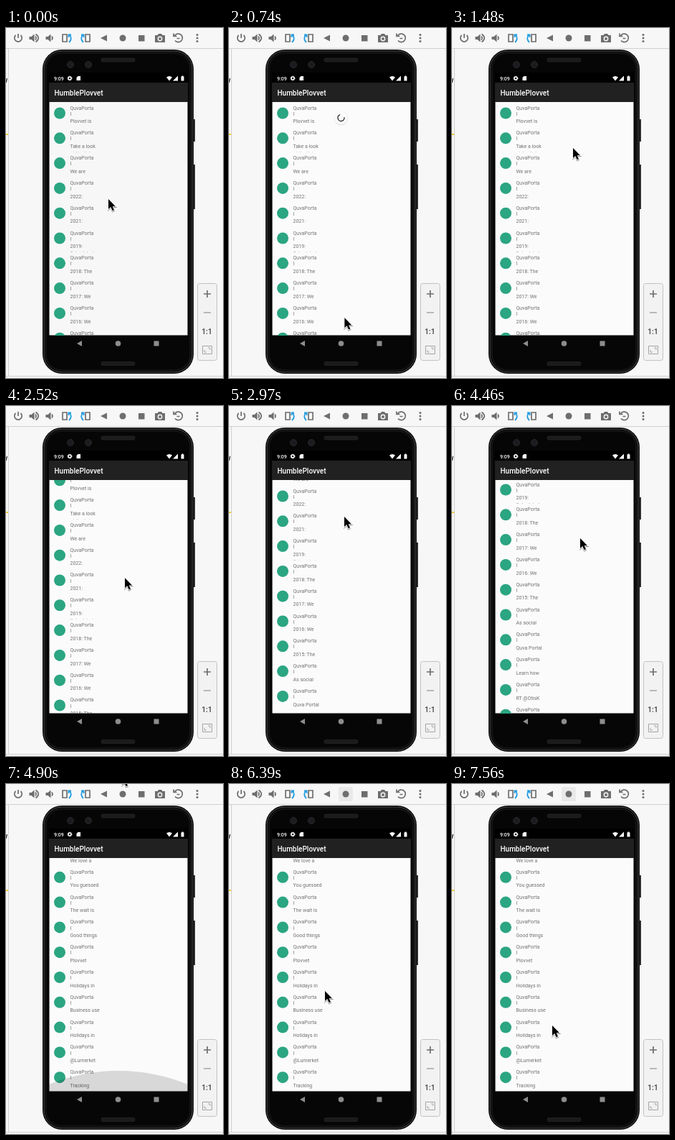
These frames come from a looping animation (303x487 px, 8 s). An HTML page:

```html
<!DOCTYPE html>
<html lang="en">
<head>
<meta charset="utf-8">
<style>
  html, body { margin: 0; height: 100%; overflow: hidden; background: #f7f7f7; }
  svg { display: block; font-family: Roboto, sans-serif; }
  .icon { fill: none; stroke: #6e6e6e; stroke-width: 1.7; }
  .solid { fill: #6e6e6e; }
  .blue { fill: none; stroke: #1e9be0; stroke-width: 1.8; }
  .row text { font-size: 7px; fill: #727272; }
  #cursor { filter: drop-shadow(.5px 1px .7px #0007); }
</style>
</head>
<body>
<svg width="303" height="487" viewBox="0 0 303 487">
  <!-- emulator window -->
  <rect width="303" height="487" fill="#f7f7f7"/>
  <path d="M3.5 28V484M0 28.500H303M0 484.500H303" stroke="#d0d0d0" fill="none"/>
  <path d="M0 148H3" stroke="#f2cf3a" stroke-width="2"/>
  <path d="M1.500 70L0 76" stroke="#222" stroke-width="1.200"/>

  <!-- toolbar -->
  <rect id="hover" x="153" y="4" width="20" height="20" rx="2" fill="#e9e9e9"/>
  <path class="icon" d="M17 8V14M13.500 10A5.200 5.200 0 1 0 20.500 10"/>
  <g id="speaker">
    <path class="solid" d="M32.500 12H35.500L39.500 8.500V19.500L35.500 16H32.500Z"/>
    <path class="icon" d="M41 11.500Q43 14 41 16.500"/>
  </g>
  <use href="#speaker" x="23"/>
  <path class="icon" d="M41.500 8.500Q49 14 41.500 19.500"/>
  <path class="icon" d="M79 9H85V19H79Z"/>
  <path class="blue" d="M88 20Q93 15 89 10M87.500 13V9.500H91"/>
  <path class="icon" d="M111 9H117V19H111Z"/>
  <path class="blue" d="M108 20Q103 15 107 10M108.500 13V9.500H105"/>
  <path class="solid" d="M132 14L141 9.500V18.500ZM185 10H193.500V18.500H185Z"/>
  <circle class="solid" cx="163" cy="14" r="4.500"/>
  <path class="solid" d="M208 10H211.500L213 8H217L218.500 10H222V20H208Z"/>
  <circle cx="215" cy="15" r="2.700" fill="#6e6e6e" stroke="#f7f7f7" stroke-width="1.400"/>
  <path class="icon" d="M235.500 11A5.800 5.800 0 1 1 236 17.500M234 7.500V11.500H238.500M238.500 14.500H242.500"/>
  <g class="solid"><circle cx="267" cy="9.500" r="1.500"/><circle cx="267" cy="14" r="1.500"/><circle cx="267" cy="18.500" r="1.500"/></g>

  <!-- zoom panel -->
  <rect x="267.500" y="355.500" width="27" height="107" rx="3" fill="#f2f2f2" stroke="#c2c2c2"/>
  <path class="icon" d="M276 370H286M281 365V375"/>
  <path d="M276 396H286" stroke="#aaa" stroke-width="1.600"/>
  <text x="280.500" y="425.500" font-size="10" font-weight="700" fill="#555" text-anchor="middle">1:1</text>
  <path d="M274.500 442.500H287.500V453.500H274.500ZM277 448V451H280M282 445H285V448" fill="none" stroke="#a5a5a5"/>

  <!-- phone -->
  <path d="M263 127V158M263 190V252" stroke="#2c2c2c" stroke-width="2"/>
  <rect x="51" y="30" width="211" height="451" rx="27" fill="#0c0c0c"/>
  <rect x="53" y="32" width="207" height="447" rx="25" fill="#0c0c0c" stroke="#484848"/>
  <rect x="56" y="35" width="201" height="441" rx="22" fill="#060606" stroke="#1c1c1c"/>
  <g fill="#1c1c20" stroke="#292929"><circle cx="90" cy="51" r="4.500"/><circle cx="115" cy="51" r="4.500"/></g>
  <g fill="#1b1b1b" stroke="#2c2c2c" stroke-width=".6">
    <rect x="133" y="42" width="47" height="5" rx="2"/>
    <rect x="133" y="464.500" width="47" height="5" rx="2"/>
  </g>
  <rect x="60" y="62" width="194" height="14" fill="#000"/>
  <rect x="60" y="76" width="194" height="27" fill="#212121"/>
  <text x="67" y="73" font-size="7" font-weight="500" fill="#fff">9:09</text>
  <circle cx="89" cy="70" r="2" fill="none" stroke="#fff" stroke-width="1.500"/>
  <circle cx="89" cy="70" r="3" fill="none" stroke="#fff" stroke-width=".9" stroke-dasharray="1.200"/>
  <path fill="#fff" d="M98.500 69L100.500 67H104V73H98.500ZM224 68.500Q228 65.500 232 68.500L228 73.500ZM240 66.500V73.500H233ZM244.500 67.500H245.500V66.500H247.500V67.500H248.500V73.500H244.500Z"/>
  <text x="67.500" y="93.500" font-size="10" font-weight="500" fill="#fff">HumblePlovvet</text>

  <svg x="60" y="103" width="194" height="325">
    <rect id="paper" x=".5" width="193" height="324.500"/>
    <g id="list"></g>
    <circle id="glow" cx="97" cy="553" r="257"/>
    <g id="spinner">
      <circle cy=".5" r="9.800" fill="#ddd"/>
      <circle r="9.300" fill="#fcfcfc"/>
      <circle id="arc" r="4.500" fill="none" stroke="#222" stroke-width="1.300" stroke-dasharray="20 9"/>
    </g>
  </svg>
  <path fill="#8d8d8d" d="M99 439L106 435V443ZM206.500 435.500H213.500V442.500H206.500Z"/>
  <circle cx="156.500" cy="439" r="3.800" fill="#8d8d8d"/>

  <path id="cursor" d="M0 0V14L3.200 11.100L5.600 16.300L8 15.200L5.700 10.200H10Z" fill="#000" stroke="#fff" stroke-width="1.800" paint-order="stroke"/>
</svg>
<script>
const LOOP = 8000, TICK = 148.2, ROW = 34.8;
const $ = id => document.getElementById(id);
const place = (id, transform) => $(id).setAttribute('transform', transform);

// A second line after "|" is cut off by the row.
const posts = [
  'Plovvet is', 'Take a look|at the list', 'We are', '2022:', '2021:', '2019:|Scheduled', '2018: The',
  '2017: We', '2016: We', '2015: The', 'As social', 'Quva Portal', 'Learn how', 'RT @OtisK',
  'We asked', 'We love a', 'You guessed', 'The wait is', 'Good things', 'Plovvet', 'Holidays in',
  'Business use', 'Holidays in', '@Lumerket', 'Tracking'
];
$('list').innerHTML = posts.map((post, i) => {
  const [line, next = ''] = post.split('|');
  return `<svg class="row" y="${i * ROW}" width="194" height="${ROW}">
    <circle cx="15" cy="15.500" r="8" fill="#2ba582"/>
    <text x="29.500" y="10.500">QuvaPorta</text><text x="29.500" y="18.700">l</text>
    <text x="29.500" y="29.200">${line}</text><text x="29.500" y="39.300">${next}</text></svg>`;
}).join('');

// Each move eases to its target: [first tick, last tick, ...target].
const pointerMoves = [
  [0, 4, 160, 447], [4, 8, 169, 167], [12, 15, 167, 255], [16, 20, 161, 154], [21, 26, 177, 306],
  [28, 30, 179, 184], [30, 33, 162, -13], [33, 34, 160, -30],
  [38, 42, 108, 262], [42, 43, 134, 288], [43, 46, 135, 316], [46, 51, 140, 336]
];
const scrollMoves = [[16, 20, 97.4], [28, 30, 176], [30, 33, 545.5]];
const spinnerMoves = [[1, 4, 42], [4, 5, 22]];

const clamp = v => Math.max(0, Math.min(1, v));
const ease = p => p * p * (3 - 2 * p);

function follow(start, moves, tick) {
  return moves.reduce((pos, [from, to, ...target]) => {
    const p = ease(clamp((tick - from) / (to - from)));
    return pos.map((v, i) => v + (target[i] - v) * p);
  }, start);
}

function draw(now) {
  const tick = Math.min(53, Math.floor((now % LOOP + 8) / TICK));
  const spinnerSize = tick ? clamp((10 - tick) / 2) : 0;
  place('cursor', `translate(${follow([143, 238], pointerMoves, tick)})`);
  place('list', `translate(0 ${-follow([0], scrollMoves, tick)})`);
  place('spinner', `translate(96.5 ${follow([-11], spinnerMoves, tick)}) scale(${spinnerSize})`);
  place('arc', `rotate(${tick * 70})`);
  $('glow').setAttribute('opacity', tick < 33 ? 0 : .14 * clamp((35 - tick) / 2));
  $('paper').setAttribute('fill', tick ? '#fbfbfb' : '#f7f7f7');
  $('hover').setAttribute('opacity', tick < 39 ? 0 : 1);
  requestAnimationFrame(draw);
}
draw(performance.now());
</script>
</body>
</html>
```
